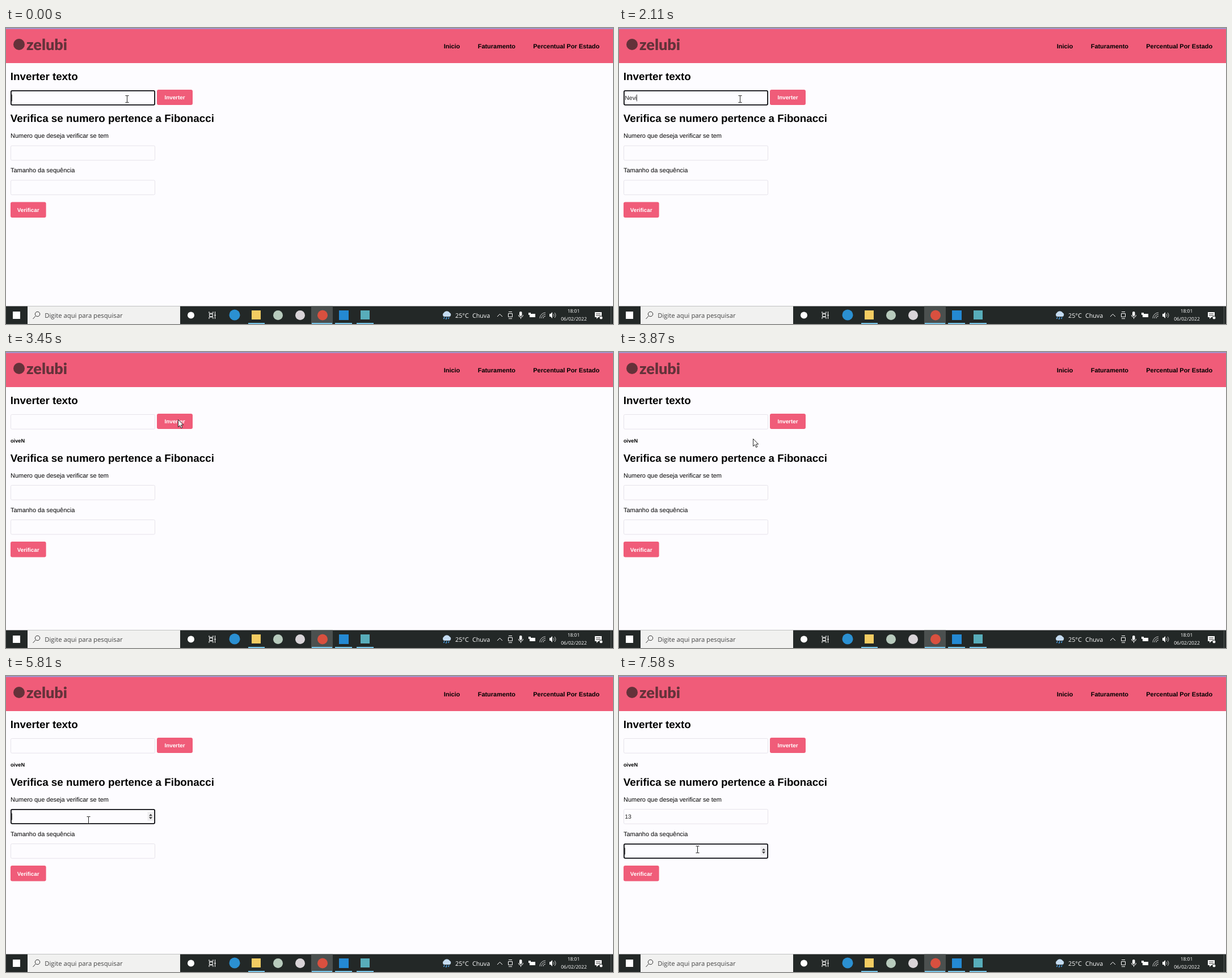
An HTML page for the animation above (8 s loop, 1070x523 px).

```html
<!DOCTYPE html>
<html lang="pt">
<head>
<meta charset="utf-8">
<style>
  html, body { margin: 0; width: 100%; height: 100%; overflow: hidden; background: #fdfcff; }
  svg { display: block; width: 1070px; height: 523px; font: 10.96px "Liberation Sans", Arial, sans-serif; }
  text { white-space: pre; text-rendering: geometricPrecision; }
  .bold, .heading, .button { font-weight: bold; }
  .heading { font-size: 18.8px; }
  .button { font-size: 9.8px; fill: #fff; text-anchor: middle; }
  .box { x: .5px; y: .5px; width: 254px; height: 25.7px; fill: #fdfcff; stroke: #e6e3ea; }
  .focus .box { x: .9px; y: .9px; width: 253.2px; height: 24.9px; stroke: #0b0b10; stroke-width: 1.8; }
  .value { font-size: 10.44px; fill: #222; }
  .system { font-family: "Open Sans", "Noto Sans", sans-serif; }
  .line { fill: none; stroke: #fff; }
</style>
</head>
<body>
<svg viewBox="0 0 1070 523">
  <rect width="1070" height="523" fill="#fdfcff"/>
  <rect width="1070" height="62" fill="#f05c79"/>
  <rect width="1070" height="2" fill="#a78fc8"/>
  <g fill="#64323a">
    <circle cx="23" cy="29" r="10"/>
    <text x="36" y="39" font-family="Lato, sans-serif" font-weight="900" font-size="27">zelubi</text>
  </g>
  <g class="bold">
    <text x="771.7" y="36">Inicio</text>
    <text x="831.7" y="36">Faturamento</text>
    <text x="929.3" y="36">Percentual Por Estado</text>
  </g>

  <text class="heading" x="7.8" y="91.7">Inverter texto</text>
  <g class="field"></g>
  <rect x="266" y="109" width="63" height="27" rx="3" fill="#f05c79"/>
  <text class="button" x="297.5" y="126">Inverter</text>
  <text class="bold" id="result" x="8" y="160.3" font-size="9.2">oiveN</text>

  <g id="lower">
    <text class="heading" x="7.8" y="166.2">Verifica se numero pertence a Fibonacci</text>
    <text x="8" y="194">Numero que deseja verificar se tem</text>
    <text x="8" y="255">Tamanho da sequência</text>
    <g class="field"></g>
    <g class="field"></g>
    <rect x="8" y="307.5" width="62.6" height="27.5" rx="3" fill="#f05c79"/>
    <text class="button" x="39.2" y="325">Verificar</text>
  </g>

  <g class="system" id="taskbar">
    <rect y="491.5" width="1070" height="32" fill="#232827"/>
    <rect x="12" y="501" width="13" height="13" fill="#fff"/>
    <rect x="38" y="491.5" width="269" height="32" fill="#f1f1f0"/>
    <path class="line" d="M52 509l-4.500 5" style="stroke:#333"/>
    <circle class="line" cx="55.500" cy="505.500" r="4.200" style="stroke:#333"/>
    <text x="68.3" y="512" font-size="11.25" fill="#444">Digite aqui para pesquisar</text>
    <circle cx="326" cy="507.500" r="6" fill="#fff"/>
    <path class="line" d="M358 501v3h7v-3M358 514v-3h7v3M358.500 505.500h6v4h-6zM368.500 501v13M367 507.500h3"/>
    <rect x="538" y="491.5" width="38" height="32" fill="#4b504f"/>
    <circle cx="403" cy="507" r="9.500" fill="#2b90d2"/>
    <rect x="433" y="499" width="16" height="16" fill="#f3cc62"/>
    <circle cx="479.500" cy="507.500" r="8.500" fill="#b8cbbd"/>
    <circle cx="518.500" cy="507.500" r="8.500" fill="#d9d4d8"/>
    <circle cx="558" cy="507.500" r="9" fill="#d9503f"/>
    <rect x="587" y="499" width="17" height="17" fill="#2489d3"/>
    <rect x="625" y="499" width="16" height="16" fill="#58adba"/>
    <path d="M427 522h29M539 522h36M580 522h30M618 522h30" stroke="#76c6ea" stroke-width="2"/>

    <path d="M772 510a4 4 0 0 1 0-7a6 6 0 0 1 10 0a3.800 3.800 0 0 1 0 7z" fill="#c4dbf0"/>
    <path d="M773 511l-1.500 3M777 511l-1.500 4M781 511l-1.500 3" stroke="#4ba3ea" stroke-width="1.500"/>
    <g fill="#fff">
      <text x="792" y="512" font-size="10.8">25°C</text>
      <text x="822" y="512" font-size="10.7">Chuva</text>
      <text x="1000.5" y="503" font-size="8.5" text-anchor="middle">18:01</text>
      <text x="1001" y="517" font-size="8.6" text-anchor="middle">06/02/2022</text>
      <rect x="905" y="501" width="4.500" height="8" rx="2"/>
      <path d="M923 505h10v6h-10zM921 503h4v4h-4zM958 505h2l3-3v11l-3-3h-2z"/>
      <path d="M1038 502h12v9h-6l-3 3v-3h-3z"/>
    </g>
    <path class="line" d="M866 510l4.500-4.500 4.500 4.500M886 501.500h6M885.500 504.500h7v6h-7zM886 513.500h6M903.500 507a4 4 0 0 0 8 0M907.500 511v3"/>
    <path class="line" d="M941 513a10 10 0 0 1 10-10M944 513a7 7 0 0 1 7-7M947 513a4 4 0 0 1 4-4M965 505q2 2.500 0 5M967 503q4 4.500 0 9" stroke-opacity=".75"/>
    <path d="M1040 505h8M1040 508h8" stroke="#333"/>
    <circle cx="1049" cy="512" r="3" fill="#fff" stroke="#232827"/>
    <path d="M1066.500 492v31" stroke="#5a5f5e"/>
  </g>

  <g id="pointer">
    <path id="beam" fill="none" stroke="#222" d="M-3-6h2.500l.5.500.5-.5H3M0-6V6M-3 6h2.500l.5-.5.5.5H3"/>
    <path id="arrow" fill="#fff" stroke="#111" stroke-width=".9" d="M0 0V13l3-2.800 2.200 4.800 2.200-1-2.200-4.600h4z"/>
  </g>
</svg>
<script>
const LOOP = 8000, SUBMIT = 3410, SHIFT = 27.5;
const $ = id => document.getElementById(id);
const show = (el, on) => el.style.display = on ? '' : 'none';

const tops = [110, 207.5, 268.5];
const fields = [...document.querySelectorAll('.field')].map((g, i) => {
  g.setAttribute('transform', `translate(8 ${tops[i]})`);
  g.innerHTML = `<rect class="box" rx="2"/>
    <text class="value" x="2.3" y="16.5"></text>
    <path class="caret" stroke="#333" stroke-width=".9" d="M0 7.500v12"/>
    <g class="spinner">
      <rect x="241.500" y="5" width="11" height="16" fill="#efeef0"/>
      <path fill="#444" d="M244 12.300h6l-3-3.800zM244 14.200h6l-3 3.800z"/>
    </g>`;
  const part = name => g.querySelector('.' + name);
  return { g, top: tops[i], value: part('value'), caret: part('caret'), spinner: part('spinner'), numeric: i > 0 };
});

// pointer path: time, x, y
const path = [
  [0, 213, 125], [2870, 213, 125], [2990, 261, 123], [3240, 303, 119], [3520, 303, 119],
  [3850, 240, 150], [4210, 174, 203], [4420, 154, 242], [4700, 145, 254],
  [6960, 145, 254], [7480, 138, 306], [LOOP, 138, 306]
];
const caretOn = [[0, 670], [1180, 1600], [1890, 2690], [3190, SUBMIT], [4760, 5260],
  [5810, 6320], [6360, 7190], [7540, LOOP]];
const nameKeys = [1240, 1890, 1990, 2090, 2190], numberKeys = [6360, 6690];

const typed = (text, keys, t) => text.slice(0, keys.filter(k => t >= k).length);

function pointerAt(t) {
  const i = path.findIndex(p => p[0] > t);
  const [t0, x0, y0] = path[i - 1], [t1, x1, y1] = path[i];
  const k = (t - t0) / (t1 - t0);
  return [x0 + (x1 - x0) * k, y0 + (y1 - y0) * k];
}

function draw(t) {
  const sent = t >= SUBMIT, shift = sent ? SHIFT : 0;
  const [x, y] = pointerAt(t);
  const inside = (right, top, bottom) => x > 8 && x < right && y > top && y < bottom;
  const focus = !sent ? 0 : t < 4760 ? -1 : t < 7540 ? 1 : 2;
  const blink = caretOn.some(([from, to]) => t >= from && t < to);
  const values = [sent ? '' : typed('Nevio', nameKeys, t), typed('13', numberKeys, t), ''];

  $('lower').setAttribute('transform', `translate(0 ${shift})`);
  show($('result'), sent);

  let overText = inside(367, 150 + shift, 171 + shift) || inside(181, 183 + shift, 197 + shift);
  fields.forEach((f, i) => {
    const top = f.top + (f.numeric ? shift : 0);
    const hover = inside(263, top, top + 27);
    overText ||= hover;
    f.value.textContent = values[i];
    f.g.classList.toggle('focus', focus === i);
    const end = values[i] ? f.value.getComputedTextLength() : 0;
    f.caret.setAttribute('transform', `translate(${2.5 + end} 0)`);
    show(f.caret, focus === i && blink);
    show(f.spinner, f.numeric && (hover || focus === i));
  });

  $('pointer').setAttribute('transform', `translate(${Math.round(x) + .5} ${Math.round(y) + .5})`);
  show($('beam'), overText);
  show($('arrow'), !overText);
}

function tick() {
  draw(performance.now() % LOOP);
  requestAnimationFrame(tick);
}
tick();
</script>
</body>
</html>
```
